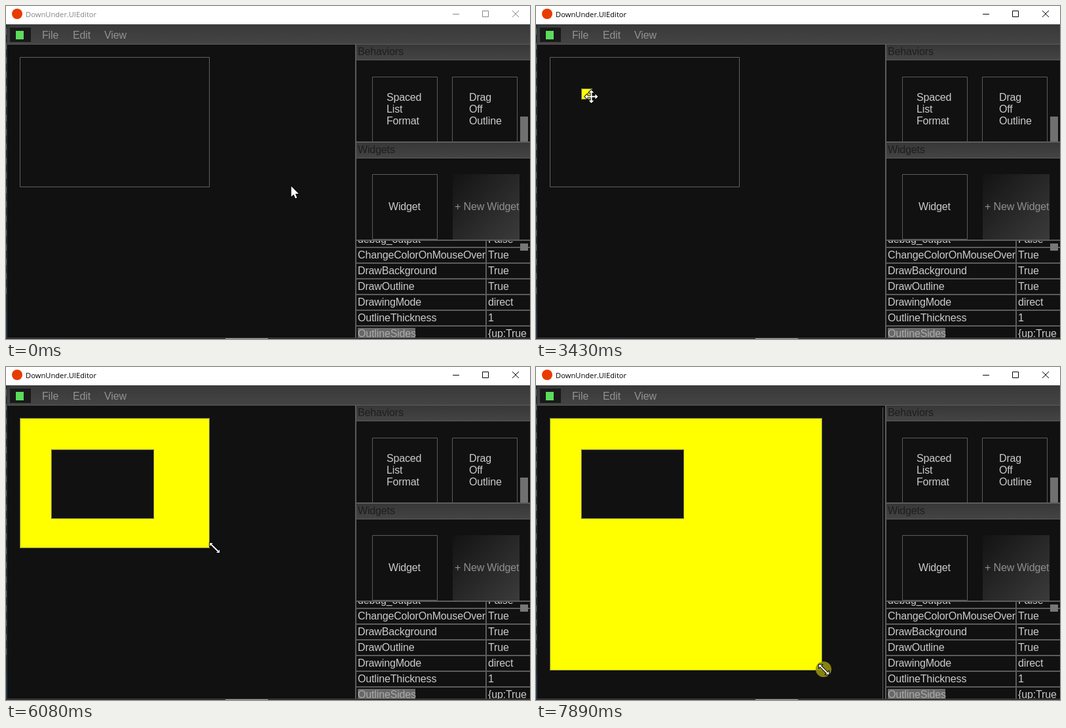
Write an HTML page with a canvas that moves like this. It is 800 px wide and 509 px high and loops after 7990 ms.

```html
<!DOCTYPE html>
<html lang="en">
<head>
<meta charset="utf-8">
<title>UI editor</title>
<style>
  html, body { margin: 0; width: 100%; height: 100%; overflow: hidden; background: #111; }
  canvas { display: block; }
</style>
</head>
<body>
<canvas id="stage" width="800" height="509"></canvas>
<script>
const ctx = document.getElementById('stage').getContext('2d');
const LOOP = 7990;
const SANS = '16px "Liberation Sans", Arial, sans-serif';
const TITLE = '11.2px "Open Sans", sans-serif';
const BG = '#111', LINE = '#5c5c5c', TEXT = '#cbcbcb';

// Each key is [time, x, y].
const pointerPath = [
  [120, 435, 275], [450, 530, 296], [800, 604, 303], [920, 606, 303],
  [1060, 560, 286], [1450, 210, 180], [1690, 83, 149], [2170, 77, 137],
  [2530, 77, 134], [3300, 84, 138], [3480, 84, 138], [4140, 90, 141],
  [4540, 90, 141], [4750, 121, 160], [5020, 186, 210], [5180, 231, 230],
  [5330, 276, 251], [5530, 296, 264], [5670, 318, 276], [6500, 318, 276],
  [6790, 317, 280], [6930, 318, 276], [7300, 472, 509], [7440, 475, 510],
  [7680, 475, 510], [7890, 439, 462]
];
const panelPath = [
  [6930, 311, 277], [7300, 467, 506], [7440, 469, 506],
  [7680, 469, 506], [7890, 437, 464]
];

function follow(path, t) {
  let i = path.findIndex(k => k[0] > t);
  if (i === 0) return path[0].slice(1);
  if (i < 0) return path[path.length - 1].slice(1);
  const a = path[i - 1], b = path[i], p = (t - a[0]) / (b[0] - a[0]);
  return [a[1] + (b[1] - a[1]) * p, a[2] + (b[2] - a[2]) * p];
}

const ramp = (t, from, to) => Math.min(1, Math.max(0, (t - from) / (to - from)));
const within = (t, from, to) => t >= from && t < to;

function mix(a, b, p) {
  return 'rgb(' + a.map((v, i) => Math.round(v + (b[i] - v) * p)).join(',') + ')';
}

function rect(x, y, w, h, color) {
  ctx.fillStyle = color;
  ctx.fillRect(x, y, w, h);
}

function box(x, y, w, h, border, fill) {
  if (fill) rect(x, y, w, h, fill);
  ctx.strokeStyle = border;
  ctx.lineWidth = 1;
  ctx.strokeRect(x + .5, y + .5, w - 1, h - 1);
}

function disc(x, y, r, color) {
  ctx.fillStyle = color;
  ctx.beginPath();
  ctx.arc(x, y, r, 0, 7);
  ctx.fill();
}

function label(str, x, y, color = TEXT, font = SANS) {
  ctx.font = font;
  ctx.letterSpacing = font === SANS ? '-0.15px' : '0px';
  ctx.fillStyle = color;
  ctx.fillText(str, x, y);
}

function lines(list, x, y) {
  list.forEach((s, i) => label(s, x, y + i * 18));
}

function gradient(x, y, w, h, dx, dy, from, to) {
  const g = ctx.createLinearGradient(x, y, x + dx, y + dy);
  g.addColorStop(0, from);
  g.addColorStop(1, to);
  rect(x, y, w, h, g);
}

function clipped(x, y, w, h, draw) {
  ctx.save();
  ctx.beginPath();
  ctx.rect(x, y, w, h);
  ctx.clip();
  draw();
  ctx.restore();
}

function stroke(points, color, width) {
  ctx.strokeStyle = color;
  ctx.lineWidth = width;
  ctx.beginPath();
  points.forEach(([x, y], i) => i ? ctx.lineTo(x, y) : ctx.moveTo(x, y));
  ctx.stroke();
}

function titleBar(active) {
  const ink = active ? '#000' : '#858585';
  rect(0, 0, 800, 28, '#fff');
  disc(17, 12, 8, '#e73c00');
  label('DownUnder.UIEditor', 30, 17, ink, TITLE);
  rect(682, 12, 10, 1, ink);
  box(727, 7, 10, 10, ink);
  stroke([[773, 7], [783, 17]], ink, 1);
  stroke([[783, 7], [773, 17]], ink, 1);
}

function menuBar() {
  gradient(1, 28, 799, 30, 0, 30, '#393939', '#444');
  rect(1, 58, 799, 1, LINE);
  rect(6, 33, 32, 22, '#191919');
  rect(15, 38, 12, 13, '#5bdc5b');
  label('File', 55, 50, '#929292');
  label('Edit', 102, 50, '#929292');
  label('View', 150, 50, '#929292');
}

function header(str, y) {
  gradient(535, y, 265, 23, 0, 23, '#373737', '#444');
  rect(535, y + 23, 265, 1, LINE);
  label(str, 537, y + 16, '#1e1e1e');
}

function properties() {
  const rows = [
    ['debug_output', 'False'], ['ChangeColorOnMouseOver', 'True'],
    ['DrawBackground', 'True'], ['DrawOutline', 'True'],
    ['DrawingMode', 'direct'], ['OutlineThickness', '1'],
    ['OutlineSides', '{up:True l']
  ];
  clipped(534, 359, 266, 148, () => {
    rows.forEach(([name, value], i) => {
      const y = 345 + i * 24;
      rect(534, y - 1, 266, 2, LINE);
      const last = i === rows.length - 1;
      if (last) rect(537, y + 3, 88, 15, '#686868');
      label(name, 537, y + 17, last ? '#aaa' : TEXT);
      label(value, 736, y + 17);
    });
    rect(732, 359, 2, 148, LINE);
    rect(785, 363, 12, 11, '#777');
  });
}

function sidePanel(t) {
  rect(533, 59, 2, 448, LINE);
  header('Behaviors', 59);
  clipped(535, 83, 265, 124, () => {
    box(559, 108, 100, 110, LINE);
    box(681, 108, 100, 110, LINE);
    lines(['Spaced', 'List', 'Format'], 581, 145);
    lines(['Drag', 'Off', 'Outline'], 707, 145);
    rect(785, 169, 12, 38, '#707070');
  });
  rect(534, 207, 266, 2, LINE);
  header('Widgets', 209);
  const hover = ramp(t, 560, 800) * (1 - ramp(t, 1080, 1400));
  box(559, 257, 100, 100, mix([92, 92, 92], [160, 160, 160], hover),
    mix([17, 17, 17], [38, 38, 38], hover));
  label('Widget', 584, 312);
  gradient(682, 257, 102, 100, 102, 100, '#131313', '#3b3b3b');
  label('+ New Widget', 685, 312, '#8f8f8f');
  rect(534, 357, 266, 2, LINE);
  properties();
}

function workspace(t, pointer) {
  const lit = t < 2530 ? ramp(t, 1420, 1690)
    : t < 3500 ? 1 - ramp(t, 2600, 3100) : ramp(t, 3680, 4140);
  const gold = ramp(t, 5670, 6000);
  const fill = gold ? mix([38, 38, 38], [255, 255, 0], gold)
    : mix([17, 17, 17], [38, 38, 38], lit);
  const [right, bottom] = follow(panelPath, t).map(Math.round);
  box(21, 78, right - 21, bottom - 78,
    gold ? mix([155, 155, 155], [120, 120, 75], gold) : mix([98, 98, 98], [155, 155, 155], lit), fill);

  if (t >= 2530) {
    let corner = [86, 143];
    if (t >= 5180) corner = [226, 232];
    else if (t >= 4540) corner = [Math.round(pointer[0]) - 5, Math.round(pointer[1]) + 3];
    const glow = ramp(t, 2600, 3000) * (1 - ramp(t, 5180, 5330));
    box(69, 126, corner[0] - 69, corner[1] - 126, '#6c6c5c',
      mix([17, 17, 17], [255, 255, 0], glow));
  }
  if (t >= 7700) rect(529, 62, 1, 445, LINE);
}

function shape(points, x, y) {
  ctx.beginPath();
  points.forEach(([px, py]) => ctx.lineTo(x + px, y + py));
  ctx.closePath();
  ctx.lineJoin = 'round';
  ctx.strokeStyle = '#000';
  ctx.lineWidth = 2;
  ctx.stroke();
  ctx.fillStyle = '#fff';
  ctx.fill();
}

const ARROW = [[0, 0], [0, 16], [3.7, 12.5], [6.3, 18.5], [8.8, 17.4], [6.2, 11.6], [11.3, 11.6]];

// Points along one arm, repeated at each quarter or half turn.
function turned(arm, count) {
  const out = [];
  for (let i = 0; i < count; i++) {
    const a = i * 2 * Math.PI / count, c = Math.cos(a), s = Math.sin(a);
    arm.forEach(([x, y]) => out.push([x * c - y * s, x * s + y * c]));
  }
  return out;
}
const MOVE = turned([[1, -1], [6, -1], [6, -4], [10, 0], [6, 4], [6, 1]], 4);
const SIZE = turned([[6, 4.6], [7.6, 2.2], [7.6, 7.6], [2.2, 7.6], [4.6, 6]], 2);

function pointerMark(t, [x, y]) {
  x = Math.round(x);
  y = Math.round(y);
  if (within(t, 930, 2530)) {
    rect(x - 6, y - 6, 19, 19, '#626262');
    rect(x - 2, y - 1, 11, 10, '#414141');
  }
  if (within(t, 920, 2530) || within(t, 4540, 5190) || t >= 6930) {
    disc(x, y + (t < 2530 ? 1 : 0), 12, 'rgba(148,144,18,.9)');
  }
  if (y > 500) return;
  if (t < 3000 || within(t, 5190, 5670)) shape(ARROW, x + .5, y + .5);
  else if (t < 4000) shape(MOVE, x + .5, y + .5);
  else shape(SIZE, x + .5, y + .5);
}

function desktopEdge() {
  rect(0, 28, 1, 481, '#1d2d2d');
  for (let y = 34; y < 440; y += 22) rect(0, y, 1, 10, '#4b6663');
  rect(0, 470, 1, 39, '#17375c');
  rect(1, 28, 1, 480, '#30363b');
  rect(0, 507, 800, 1, '#4a4a4a');
  rect(0, 508, 800, 1, '#241c20');
  rect(335, 508, 65, 1, '#a5a5a5');
}

function frame(now) {
  const t = now % LOOP;
  const pointer = follow(pointerPath, t);
  rect(0, 0, 800, 509, BG);
  titleBar(t >= 920);
  menuBar();
  desktopEdge();
  sidePanel(t);
  workspace(t, pointer);
  pointerMark(t, pointer);
}

const start = performance.now();
function tick() {
  frame(performance.now() - start);
  requestAnimationFrame(tick);
}
tick();
</script>
</body>
</html>
```
